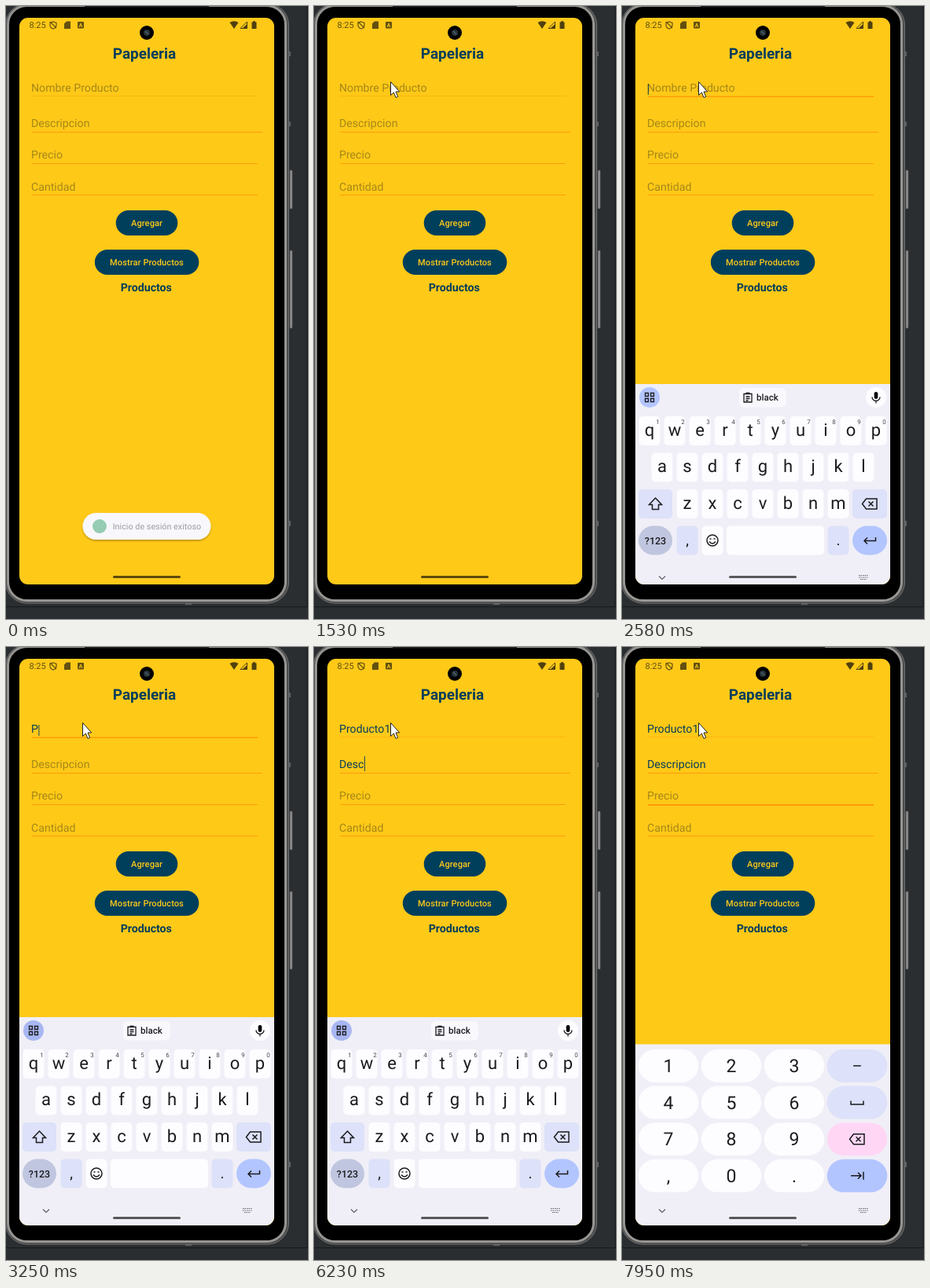
Write an HTML page that moves like this. It is 384x780 px and loops after 8 s.

```html
<!DOCTYPE html>
<html lang="es">
<head>
<meta charset="utf-8">
<style>
html, body { margin: 0; width: 100%; height: 100%; overflow: hidden; background: #2a2e31; }
svg { display: block; width: 384px; height: 780px; font-family: Roboto, sans-serif; text-rendering: geometricPrecision; }
.field { font-size: 14.17px; }
.button { font-size: 11.02px; font-weight: 500; letter-spacing: .1px; fill: #ffc918; }
.mid { text-anchor: middle; }
.bold { font-weight: 700; fill: #003d5b; }
.key { font-size: 22px; fill: #1b1b1f; }
.line { fill: none; stroke: #1b1b1f; stroke-width: 1.5; }
</style>
</head>
<body>
<svg viewBox="0 0 384 780">
  <defs>
    <clipPath id="clip"><rect x="17" y="15" width="324" height="721" rx="11"/></clipPath>
    <filter id="shadow" x="-10%" y="-20%" width="120%" height="160%"><feDropShadow dx="0" dy="1.5" stdDeviation="1" flood-opacity=".3"/></filter>
  </defs>

  <!-- phone -->
  <path d="M0 764.5H384M383 0V764" stroke="#17181a"/>
  <path d="M357 58h5v6h-5zM357 147h5v6h-5zM357 655h5v7h-5zM228 758h8v4h-8z" fill="#5b5c5e"/>
  <g fill="#8f8f8f" stroke="#55565a" stroke-width=".6">
    <rect x="361" y="209" width="3" height="49" rx="1"/>
    <rect x="361" y="311" width="3" height="99" rx="1"/>
  </g>
  <rect x="-.5" y="-3" width="360" height="763" rx="27" fill="#4c4c4c" stroke="#6f6f70"/>
  <rect x="2.500" y="-.5" width="353" height="757" rx="24" stroke="#979693" stroke-width="3"/>
  <path d="M100 .5H258" stroke="#222" stroke-width="2"/>

  <g clip-path="url(#clip)">
    <rect x="17" y="15" width="324" height="721" fill="#ffc918"/>

    <!-- status bar -->
    <g fill="#63500f">
      <text x="29.500" y="28" font-size="11">8:25</text>
      <path d="M60 20l4 1.500v3q0 3-4 4.500q-4-1.500-4-4.500v-3zM56 20l8 8" fill="none" stroke="#63500f" stroke-width="1.200"/>
      <path d="M77 19.500h5v9.500h-8v-6.500z"/>
      <rect x="91" y="20" width="8" height="8.500" rx="1"/>
      <path d="M93 27l2-5 2 5M93.700 25.300h2.600" fill="none" stroke="#ffc918" stroke-width=".9"/>
      <path d="M284.500 21q5.500-3.500 11 0l-5.500 8z" fill="#4f400f"/>
      <path d="M306.500 20v8.500h-8.500z" fill="none" stroke="#4f400f"/>
      <path d="M306.500 23v5.500h-6z" fill="#4f400f"/>
      <path d="M312.500 20.500h1.500v-1.300h3v1.300h1.500v8.500h-6z" fill="#4f400f"/>
    </g>
    <circle cx="179" cy="34" r="9"/>
    <circle cx="179" cy="34" r="4" fill="#26343a"/>
    <path d="M177 32l4 4" stroke="#51626a" stroke-width="1.200"/>

    <!-- form -->
    <text class="mid bold" x="176" y="67" font-size="18.900">Papeleria</text>
    <g id="form"></g>
    <g fill="#003f5c">
      <rect x="139.700" y="260" width="78.600" height="32" rx="16"/>
      <rect x="112.800" y="310" width="132.500" height="32" rx="16"/>
    </g>
    <text class="mid button" x="179" y="280">Agregar</text>
    <text class="mid button" x="179" y="330">Mostrar Productos</text>
    <text class="mid bold" x="178.300" y="363" font-size="14.170">Productos</text>
    <rect id="caret" width="1.100" fill="#0b3f57" opacity=".85"/>

    <g id="toast">
      <rect x="97.500" y="645" width="163" height="34" rx="17" fill="#f8f8fc" filter="url(#shadow)"/>
      <circle cx="119" cy="662" r="9" fill="#95ccb3"/>
      <text x="135.700" y="666" font-size="10.800" fill="#9c9ca1">Inicio de sesión exitoso</text>
    </g>

    <g id="board">
      <rect id="panel" x="17" width="324" height="300" fill="#f0eff7"/>
      <g id="letters"></g>
      <g id="digits"></g>
      <g class="line" style="stroke:#5f5f68;stroke-width:1.200">
        <path d="M47 715.500l4 4 4-4"/>
        <path d="M301 714.500h12M301 717h12M303 719.500h8" stroke-dasharray="1.500 1"/>
      </g>
    </g>
    <rect x="136" y="725" width="86" height="3" rx="1.500" opacity=".63"/>
  </g>

  <path id="pointer" d="M.5 .5V17.500L4.400 14 7 20.500 9.600 19.400 7 13H11.700Z" fill="#fff" stroke="#222" stroke-width="1"/>
</svg>
<script>
const $ = id => document.getElementById(id);
const show = (el, on) => el.setAttribute('visibility', on ? 'inherit' : 'hidden');
const BLUE = '#b3c5ff', PALE = '#dde1f9', WHITE = '#fdfcff';

// ---- form fields
const fields = [
  { hint: 'Nombre Producto', text: 'Producto1', base: 109, line: 114, end: 320, caret: [99, 14],
    keys: [3180, 3440, 3540, 3640, 3840, 3930, 4020, 4110, 4370], focus: [2120, 5300] },
  { hint: 'Descripcion', text: 'Descripcion', base: 154, line: 160, end: 326, caret: [139, 19],
    keys: [5760, 5900, 6030, 6230, 6290, 6430, 6620, 6690, 6890, 7020, 7290], focus: [5300, 7420] },
  { hint: 'Precio', text: '', base: 194, line: 200, end: 320, caret: [184, 14], keys: [], focus: [7420, 7950] },
  { hint: 'Cantidad', text: '', base: 234.5, line: 240, end: 320, keys: [], focus: [9e9, 9e9] }
];
$('form').innerHTML = fields.map((f, i) => `
  <rect x="33" y="${f.line}" width="${f.end - 33}" height="1" fill="#ff9a08" opacity="${i ? .95 : .4}"/>
  <rect x="33" y="${f.line + 1}" width="${f.end - 33}" height="1" fill="#ff9a08"/>
  <text class="field" x="32" y="${f.base}"></text>`).join('');
fields.forEach((f, i) => [, f.bold, f.label] = [...$('form').children].slice(i * 3));

// ---- keyboards
const key = (cx, y, w, h, r, fill, inner) =>
  `<rect x="${cx - w / 2}" y="${y}" width="${w}" height="${h}" rx="${r}" fill="${fill}"/>
   <g transform="translate(${cx} ${y + h / 2})">${inner}</g>`;
const label = (s, dy = 6.3, size = 22) => `<text class="mid key" y="${dy}" style="font-size:${size}px">${s}</text>`;
const icon = d => `<path class="line" d="${d}"/>`;
const erase = icon('M-9.500 0L-4.500 -6.500H9V6.500H-4.500ZM-1.500 -3L4.500 3M4.500 -3L-1.500 3');

const row = (s, x, y, nums) => [...s].map((c, i) => key(x + 32 * i, y, 27, 37, 5, WHITE, label(c) +
  (nums ? `<text class="mid" x="10.500" y="-9" font-size="8" fill="#45464f">${(i + 1) % 10}</text>` : ''))).join('');

$('letters').innerHTML = `
  <circle id="menu" cx="35" cy="488" r="13"/>
  <path class="line" style="stroke-width:1.300" d="M29.500 482.500h4v4h-4zM36.500 482.500h4v4h-4zM29.500 489.500h4v4h-4zM36.500 489.500h4v4h-4z"/>
  <g id="chip">
    <rect x="149" y="476" width="60" height="24.500" rx="6" fill="#f9f8fd"/>
    <path class="line" style="stroke-width:1.300" d="M155 483.500h10v10.500h-10zM157.500 487h5M157.500 489.500h5M157.500 492h3M157.500 482.500h5"/>
    <text x="171" y="492" font-size="11.500" font-weight="500" fill="#1b1b1f">black</text>
  </g>
  <circle cx="323" cy="488" r="13" fill="${WHITE}"/>
  <rect x="320.700" y="481" width="4.600" height="9" rx="2.300"/>
  <path class="line" style="stroke-width:1.300" d="M318 487.500a5 5 0 0 0 10 0M323 492.500v3"/>` +
  row('qwertyuiop', 35, 512, true) + row('asdfghjkl', 51, 558.5) + row('zxcvbnm', 83, 605) +
  key(42.5, 605, 43, 37, 5, PALE, icon('M0 -7.500L8 1H4V7H-4V1H-8Z')) +
  key(315, 605, 44, 37, 5, PALE, erase) +
  key(42.5, 651.5, 43, 37, 18.5, '#c0c6df', label('?123', 4.5, 12.5).replace('size:', 'weight:500;font-size:')) +
  key(83, 651.5, 27, 37, 5, PALE, label(',', 6, 19)) +
  key(115, 651.5, 27, 37, 5, WHITE, '<circle class="line" r="7"/>' +
    icon('M-3.500 -2h2M1.500 -2h2M-4 1.500q4 5 8 0')) +
  key(195, 651.5, 124, 37, 5, WHITE, '') +
  key(275, 651.5, 27, 37, 5, PALE, label('.', 6, 19)) +
  key(315, 651.5, 44, 37, 18.5, BLUE, icon('M7.500 -4V.5H-7M-3 -3.500L-7 .5L-3 4.500'));

const pad = [...'123', label('–', 7, 20), ...'456', icon('M-8 -2V2.500H8V-2'), ...'789', erase, ...',0.',
  icon('M-8 0H5M1 -4L5 0L1 4M8 -5V5')];
const sideFill = [PALE, PALE, '#ffd7f5', BLUE];
$('digits').innerHTML = pad.map((s, i) => key(59 + 80 * (i % 4), 512 + 46.6 * (i >> 2), 76.5, 42, 21,
  i % 4 == 3 ? sideFill[i >> 2] : WHITE, s.length > 1 ? s : label(s, 8, 23))).join('');

// ---- motion
// Share done (0 to 1) of a move made in n held steps, the first at a, the last at b.
const steps = (t, a, b, n) => t < a ? 0 : Math.min(1, (Math.floor((t - a) / (b - a) * (n - 1) + 1e-6) + 1) / n);
const smooth = u => u * u * (3 - 2 * u);
const moves = [[70, 810, 11, 90, 74], [940, 1130, 4, 110, 108], [1400, 1530, 3, 97, 96]];
const rise = [[2450, 620, .33, .25], [2520, 528, .75, .7], [2580, 481, 1, 1], [2650, 475, 1, 1], [2780, 471, 1, 1]];

function draw(t) {
  let x = 366, y = 780;
  for (const [a, b, n, tx, ty] of moves) {
    const u = smooth(steps(t, a, b, n));
    x += (tx - x) * u;
    y += (ty - y) * u;
  }
  $('pointer').setAttribute('transform', `translate(${x} ${y})`);
  show($('pointer'), t >= 70);
  $('toast').setAttribute('opacity', 1 - steps(t, 70, 290, 4));

  show($('caret'), false);
  for (const f of fields) {
    const n = f.keys.filter(k => k <= t).length;
    const on = t >= f.focus[0] && t < f.focus[1];
    f.label.textContent = n ? f.text.slice(0, n) : f.hint;
    f.label.setAttribute('fill', n ? '#063d5b' : '#a58719');
    show(f.bold, t >= f.focus[0] && (t < f.focus[1] || f.hint == 'Precio') && f.hint != 'Descripcion');
    if (on) {
      show($('caret'), true);
      $('caret').setAttribute('x', 32.8 + (n ? f.label.getComputedTextLength() - .4 : 0));
      $('caret').setAttribute('y', f.caret[0]);
      $('caret').setAttribute('height', f.caret[1]);
    }
  }

  const pose = rise.filter(r => r[0] <= t).pop();
  show($('board'), pose);
  if (pose) {
    const [, top, alpha, size] = pose, numeric = t >= 7490;
    $('board').setAttribute('transform', `translate(0 ${top - 471})`);
    $('board').setAttribute('opacity', alpha);
    $('panel').setAttribute('y', numeric ? 505.5 : 471);
    $('chip').setAttribute('transform', `translate(176 488) scale(${size}) translate(-176 -488)`);
    $('menu').setAttribute('fill', t < 3250 ? BLUE : '#a8b7f2');
    show($('letters'), !numeric);
    show($('digits'), numeric);
  }
}

function tick() {
  draw(performance.now() % 8000);
  requestAnimationFrame(tick);
}
tick();
</script>
</body>
</html>
```
